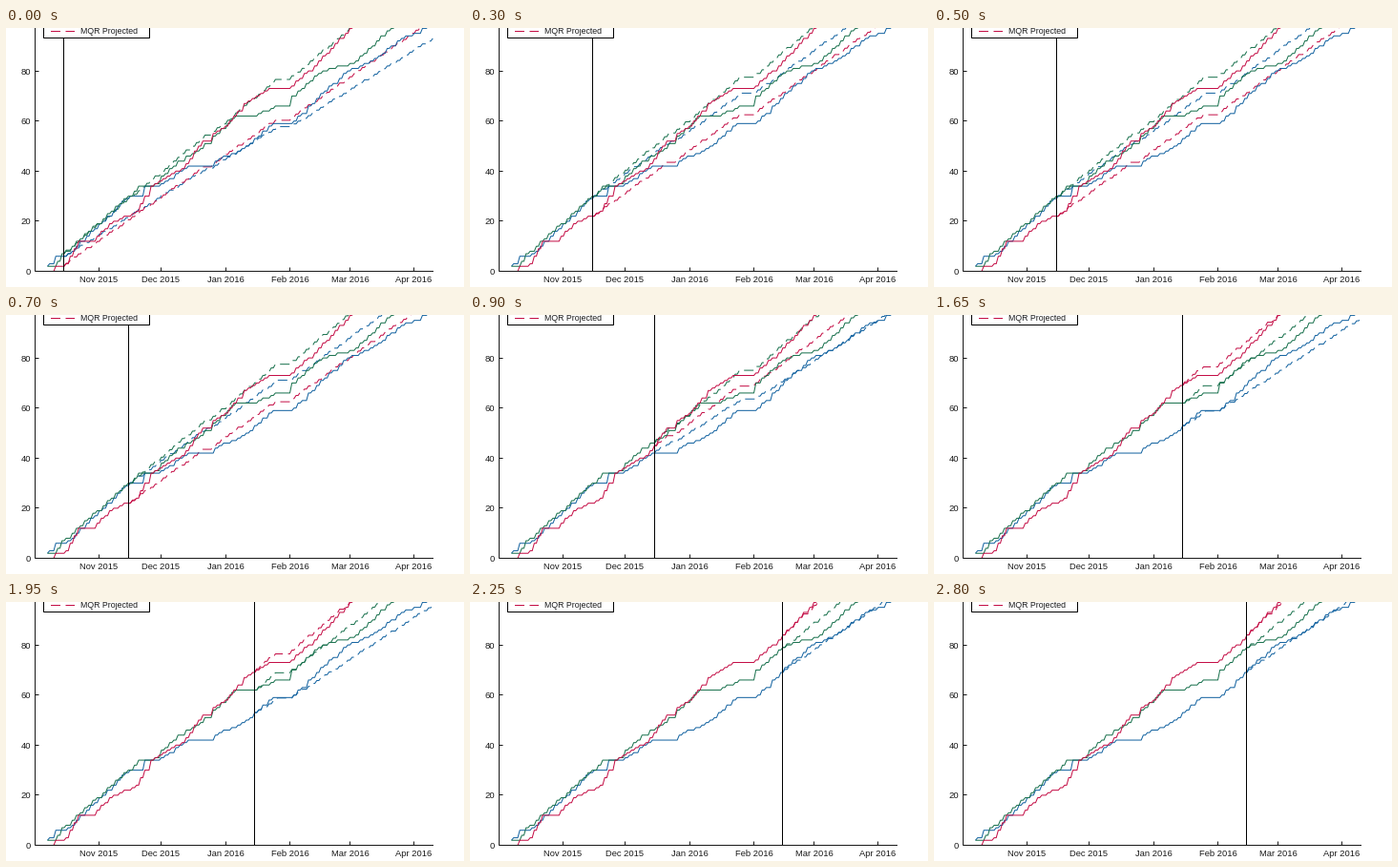
A matplotlib script that plays this animation: 480 by 272 pixels, repeating every 2900 ms.

```python
import matplotlib.pyplot as plt
import numpy as np
from matplotlib.animation import FuncAnimation
from matplotlib.patches import Rectangle

W, H, DPI = 480, 272, 100
PX = 72 / DPI                    # one pixel in points
LEFT, RIGHT, BASE = 30.5, 448, 255.5
FONT = "Liberation Sans"
GREEN, BLUE, RED = "#17704c", "#1262a0", "#c40d45"
INK = "#1a1a1a"
DASH = (0, (10, 5.5))

# Days count from 7 October, the start of the season.
DAYS = np.arange(187)
MONTHS = {"Nov 2015": 25, "Dec 2015": 55, "Jan 2016": 86,
          "Feb 2016": 117, "Mar 2016": 146, "Apr 2016": 177}
VIEW_DAYS = [8, 39, 69, 100, 131]
VIEW_MS, FIRST_OFFSET = 667, 435     # the loop opens partway through a view
FRAME_MS, FRAMES = 50, 58


def x_at(day):
    return 43.5 + 2.171 * day


def y_at(points):
    return BASE - 2.63 * points


def centre(v):
    """Middle of the pixel holding v, for crisp straight lines."""
    return np.floor(v) + 0.5


class Team:
    """Turning points of the standings, and the total forecast at each view."""

    def __init__(self, color, keys, totals, phase):
        self.color, self.totals = color, totals
        resting = ((DAYS >= 78) & (DAYS < 80)) | ((DAYS >= 112) & (DAYS < 118))
        self.games = np.floor(np.cumsum(~resting) / 2.15 + phase)
        # Points change only on the day of a game.
        last_game = np.searchsorted(self.games, self.games)
        self.points = np.round(np.interp(last_game, *zip(*keys)))

    def projection(self, view):
        start = VIEW_DAYS[view]
        played = self.games[start:] - self.games[start]
        now = self.points[start]
        pace = (self.totals[view] - now) / played[-1]
        return x_at(DAYS[start:]), y_at(now + pace * played)


TEAMS = [
    Team(BLUE, [(0, 2), (3, 6), (9, 6), (39, 30), (44, 30), (46, 34), (52, 34),
                (69, 42), (76, 42), (96, 50), (109, 59), (118, 59), (131, 70),
                (145, 80), (157, 84), (172, 94), (179, 95), (184, 100)],
         [93, 112, 100, 96, 101], 0.1),
    Team(GREEN, [(0, 2), (4, 2), (6, 6), (39, 30), (44, 34), (51, 34), (60, 42),
                 (72, 48), (91, 62), (100, 62), (117, 69), (132, 80), (148, 83),
                 (160, 93), (170, 100)],
         [124, 125, 124, 113, 115], 0.4),
    Team(RED, [(0, 0), (2, 0), (3, 2), (8, 2), (15, 12), (22, 12), (31, 20),
               (42, 23), (50, 34), (65, 41), (75, 52), (87, 59), (95, 67),
               (106, 73), (118, 74), (131, 84), (152, 102)],
         [100, 103, 111, 124, 126], 0.7),
]

fig = plt.figure(figsize=(W / DPI, H / DPI), dpi=DPI, facecolor="white")
ax = fig.add_axes([0, 0, 1, 1])
ax.set_xlim(0, W)
ax.set_ylim(H, 0)
ax.axis("off")


def stroke(xs, ys, color=INK, **kw):
    return ax.plot(xs, ys, color=color, lw=PX, snap=False,
                   solid_capstyle="butt", dash_capstyle="butt", **kw)[0]


def label(x, y, text, size, ha):
    ax.text(x, y, text, fontsize=size * PX, family=FONT, color=INK,
            ha=ha, va="baseline", zorder=6)


# Axes
stroke([LEFT, LEFT], [0, BASE], zorder=4)
stroke([LEFT, RIGHT], [BASE, BASE], zorder=4)
for value in range(0, 100, 20):
    y = centre(y_at(value))
    stroke([LEFT, LEFT + 4], [y, y], zorder=4)
    label(26.3, y + 3.2, str(value), 9.5, "right")
for name, day in MONTHS.items():
    x = centre(x_at(day))
    stroke([x, x], [BASE, BASE - 4], zorder=4)
    label(x, 267.3, name, 9.4, "center")

# Legend
ax.add_patch(Rectangle((39.5, -30), 111, 40.5, fc="white", ec="black",
                       lw=PX, snap=False, zorder=5))
stroke([47, 72], [3.5, 3.5], RED, ls=DASH, zorder=6)
label(78, 6.3, "MQR Projected", 8.8, "left")

# Standings and projections
for team in TEAMS:
    stroke(x_at(DAYS), y_at(team.points), team.color, zorder=3)
dashes = [stroke([], [], team.color, ls=DASH, zorder=2) for team in TEAMS]
marker = stroke([], [], "black", zorder=3.5)


def update(frame):
    view = (frame * FRAME_MS + FIRST_OFFSET) // VIEW_MS
    x = centre(x_at(VIEW_DAYS[view]))
    marker.set_data([x, x], [0, BASE])
    for line, team in zip(dashes, TEAMS):
        line.set_data(*team.projection(view))
    return dashes + [marker]


anim = FuncAnimation(fig, update, frames=FRAMES, interval=FRAME_MS,
                     repeat=True, repeat_delay=0, blit=False)
plt.show()
```
